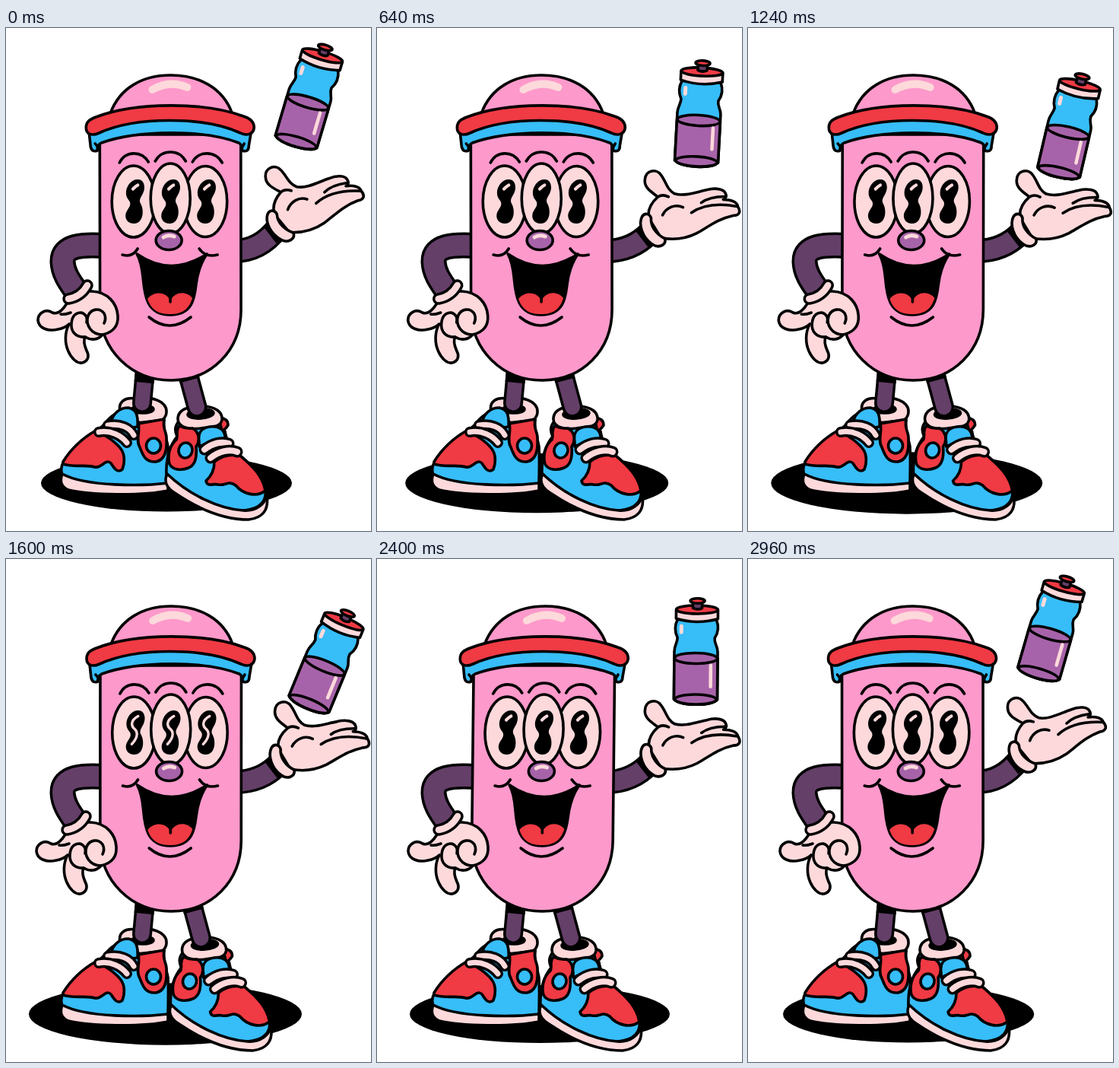
Recreate the animation shown at these times as an HTML page. Size 480 by 661 pixels, loop 3 s.

```html
<!DOCTYPE html>
<html lang="en">
<head>
<meta charset="utf-8">
<title>Capsule mascot</title>
<style>
html, body { margin: 0; width: 100%; height: 100%; overflow: hidden; background: #fff }
svg { display: block; width: 480px; height: 661px; stroke: #000; stroke-width: 3.6; stroke-linecap: round; stroke-linejoin: round; fill: none }
.pink { fill: #fd99cb } .pale { fill: #fdd9db } .red { fill: #f03a44 } .blue { fill: #37bdf8 }
.plum { fill: #643f68 } .violet { fill: #a763a9 } .ink { fill: #000 }
.shine { stroke: #fdd9db }
</style>
</head>
<body>
<svg id="stage" viewBox="0 0 480 661"></svg>
<script>
const PALE = '#fdd9db', PLUM = '#643f68', LOOP = 3000, STEP = 40;
const shape = (cls, d) => `<path class="${cls}" d="${d}"/>`;
const line = d => `<path d="${d}"/>`;
const oval = (cls, x, y, rx, ry, more = '') => `<ellipse class="${cls}" cx="${x}" cy="${y}" rx="${rx}" ry="${ry}" ${more}/>`;
const tube = (d, w, color, id = '') =>
  `<g id="${id}"><path d="${d}" stroke-width="${w}"/><path d="${d}" stroke-width="${w - 7}" stroke="${color}"/></g>`;
const shade = (d, w, id = '') => `<path id="${id}" d="${d}" stroke-width="${w}" stroke-linecap="butt"/>`;

const leftShoe =
  shape('pale', 'M150 504C147 490 158 485 170 487C190 483 212 490 211 505C210 517 196 521 180 521Z') +
  oval('ink', 180, 501, 14, 5) +
  shape('blue', 'M77 568C90 545 115 536 128 522C136 512 142 506 152 505L172 519L208 515C206 530 211 538 213 550C214 570 213 590 213 600C180 605 110 605 75 590C71 582 73 574 77 568Z') +
  shape('red', 'M75 570C88 549 104 537 118 529C132 535 146 546 151 553C157 561 156 573 153 580C147 585 143 580 138 572C131 565 126 579 117 577C106 573 90 578 75 573Z') +
  shape('red', 'M174 520L208 514C205 526 212 532 211 540C212 556 208 568 197 570C183 571 180 561 176 551C170 541 177 531 174 520Z') +
  oval('blue', 194, 549, 9.5, 10) +
  shape('blue', 'M138 520C140 505 151 499 161 499C171 501 174 508 173 524Q156 527 138 520Z') +
  tube('M134 522C150 519 163 525 168 535', 14, PALE) +
  tube('M122 531C138 528 152 536 159 545', 14, PALE) +
  shape('pale', 'M74 586C70 597 74 604 82 607C110 614 180 615 213 608L213 598C180 602 105 603 74 586Z');

const rightShoe =
  shape('red', 'M280 513Q292 512 292 522Q288 528 284 530Z') +
  shape('blue', 'M228 516C221 524 222 530 225 537C216 548 210 566 211 588C240 615 285 636 313 634C336 632 343 620 341 606C333 585 316 570 304 558C296 550 290 544 288 530L270 520Z') +
  shape('pale', 'M226 514C226 501 240 497 257 497C276 497 285 505 284 515C282 526 266 524 256 526C242 528 226 525 226 514Z') +
  oval('ink', 256, 507, 17, 6, 'transform="rotate(-4 256 507)"') +
  shape('red', 'M228 523C222 529 227 534 224 541C215 549 212 562 215 573C219 581 231 582 240 578C250 574 251 561 250 550C257 540 252 529 245 526Q236 527 228 523Z') +
  oval('blue', 236, 555, 9, 10, 'transform="rotate(15 236 555)"') +
  shape('red', 'M274 570C284 562 297 560 308 562C325 576 338 590 341 608C330 617 312 613 302 601C293 594 288 602 279 600C272 598 265 604 263 595C271 588 274 580 274 570Z') +
  shape('blue', 'M254 544C252 532 256 526 268 524C280 522 289 528 288 540Q270 542 254 550Z') +
  tube('M261 554C272 545 284 543 293 546', 15, PALE) +
  tube('M269 565C280 556 294 553 304 557', 15, PALE) +
  shape('pale', 'M212 586C207 596 212 605 222 611C250 630 285 646 319 646C337 644 346 634 343 614C340 626 330 635 312 634C280 632 240 613 212 586Z');

const leftHand =
  shape('pale', 'M80 362C75 370 68 377 61 374C52 368 42 375 42 384C43 395 56 399 68 396C74 395 79 393 83 389C77 400 77 414 82 425C86 434 93 441 100 440C108 438 110 431 106 424C103 417 102 410 104 406C112 411 121 410 127 403C140 400 148 392 147 378C146 362 134 347 113 346L104 346Z') +
  line('M72 376C78 377 82 375 85 374M104 406C92 407 85 399 86 388C87 378 92 374 99 374C106 376 107 382 106 387M127 403C112 403 104 390 108 378C112 369 123 367 129 375C131 379 131 384 129 388') +
  tube('M82 356Q99 353 107 338', 15.5, PALE);

const rightHand =
  shape('pale', 'M358 250C356 240 361 230 370 222C362 216 352 210 353 200C353 187 368 184 374 193C381 202 382 213 392 218C405 222 420 216 435 213C446 210 457 212 459 218C461 222 459 225 456 226C466 226 474 229 475 235C480 243 476 247 469 247C450 251 437 261 421 270C405 278 390 279 374 276Z') +
  line('M370 222Q376 218 384 222M376 246C381 236 393 231 403 236M458 222C445 222 435 224 427 230M474 235C453 231 430 232 414 243') +
  shape('pale', 'M349 248C344 258 349 275 362 284C370 290 381 286 379 277C369 272 360 262 361 250C359 243 352 243 349 248Z');

const pupil = 'M172 199C181 198 184 208 180 217C177 223 174 226 177 231C182 240 180 257 168 257C159 257 155 249 158 242C161 236 166 232 161 226C156 220 157 212 161 206C164 202 168 199 172 199Z';
const eye = i => `<g transform="translate(${47 * i} 0)"><path class="ink" stroke="none" d="${pupil}"/>
  <path class="shine glint" d="M173 206.500C163 212 163 219 169 224C174 229 171 237 164 244"/>
  <path class="shine gap" stroke-linecap="butt"/></g>`;

const body =
  shape('pink', 'M123 140L123.500 370C124 424 165 463 217 463C270 463 309 424 309 370L308.500 140Z') +
  shape('pink', 'M137 112C149 79 179 62 216 62C254 62 285 79 297 112Z') +
  '<path class="shine" stroke-width="10" d="M192 81Q215 68 238 78"/>' +
  shape('blue', 'M109 138L111 156Q113 164 120 161Q119 154 125 151C172 134 260 133 306 151Q311 154 310 161Q319 164 319 155L322 137L308 130C260 109 170 109 122 130Z') +
  line('M117 152L121 157M313 152L310 157') +
  shape('red', 'M105 131C105 123 110 120 118 117C170 97 262 97 312 116C322 119 326 124 326 131C325 140 316 142 308 138C260 116 170 116 122 138C113 142 105 140 105 131Z') +
  line('M149 177C157 161 178 161 187 176M196 175C205 159 227 159 236 175M245 176C253 161 275 161 284 177') +
  oval('pale', 167.5, 228, 28.500, 47) + oval('pale', 262, 228, 28.500, 46.500) + oval('pale', 216, 224, 26, 46) +
  [0, 1, 2].map(eye).join('') +
  oval('violet', 214, 279, 17, 12.500) +
  '<path class="shine" stroke-width="5" d="M207 275Q213 271 221 274"/>' +
  line('M153 298Q166 302 173 290M254 290Q262 302 278 298') +
  shape('ink', 'M172 297Q178 308 180 328C182 350 184 377 216 377C247 377 248 352 250 336Q253 313 264 297Q217 328 172 297Z') +
  '<path class="red" stroke="none" d="M186 356C194 345 212 346 216 359C222 345 238 346 245 355C240 371 230 376 216 376C201 376 191 371 186 356Z"/>' +
  line('M216 350V360M188 380Q215 402 243 380');

const bottle =
  shape('blue', 'M-25 -42C-30 -32 -28 -24 -25 -18C-25 -11 -29 -8 -29 0L-29 63C-20 72 20 72 28 63L28 0C28 -8 23 -10 24 -18C28 -24 30 -32 26 -42Z') +
  shape('violet', 'M-29 9L-29 63C-20 72 20 72 28 63L28 9Z') +
  oval('violet', -.5, 9, 28, 7) + oval('violet', -.5, 63, 27, 6.500) +
  shape('pale', 'M-27 -54V-43Q0 -35 28 -43V-54Z') +
  oval('red', .5, -55, 27.500, 5.500) +
  shape('plum', 'M-5 -66V-57Q1 -54 7 -57V-66Z') +
  oval('red', 1, -66.500, 9.500, 3.300) +
  '<path class="shine" stroke-width="5" d="M-20 -33V-25"/><path class="shine" stroke-width="4.500" d="M19 18V46"/>';

const $ = id => document.getElementById(id);
$('stage').innerHTML =
  '<ellipse id="shadow" class="ink" stroke="none" cy="598"/>' + leftShoe +
  tube('M183 450L179 493', 26, PLUM) + shade('M183 450L181.500 466', 26) +
  `<g id="rightFoot">${rightShoe + tube('M238 450L251 498', 27, PLUM) + shade('M238 450L241.500 463', 27)}</g>` +
  tube('M130 286C100 284 74 286 74.500 307C75 322 84 334 91 344', 34, PLUM) +
  tube('', 32, PLUM, 'rightArm') + shade('', 12, 'cuffShade') +
  `<g id="body">${body}</g><g id="leftHand">${leftHand}</g><g id="rightHand">${rightHand}</g><g id="bottle">${bottle}</g>`;

// Pose values at each key time, joined by a periodic cubic curve.
const keys = [0, 360, 920, 1600, 2080, 2400];
const pose = {
  bottleX: [400, 420.5, 424, 423, 428.5, 420],
  bottleY: [89, 101.5, 122, 132.5, 133.5, 121.5],
  bottleTilt: [16.5, 7, 3, 22.5, .5, .5],
  handX: [-2, -1, 0, 0, 2, 0],
  handY: [-6, -1, 0, 0, 2, -1],
  handTilt: [-8, -1.5, 0, .5, 1, -.5],
  lean: [.3, -.8, 1.5, 1, 3, 4.3],
  leftX: [0, -1, -1.5, -2, -2, -1],
  foot: [0, 4, 7, 5.5, 5, 4],
  shadowL: [46, 42, 33, 30, 40, 43],
  shadowR: [376, 381, 385, 389, 387, 385]
};

function curve(v, t) {
  const n = keys.length;
  const time = i => keys[(i + n) % n] + LOOP * Math.floor(i / n);
  const val = i => v[(i + n) % n];
  const slope = i => (val(i + 1) - val(i - 1)) / (time(i + 1) - time(i - 1));
  let i = n - 1;
  while (keys[i] > t) i--;
  const d = time(i + 1) - time(i), u = (t - time(i)) / d, w = 1 - u;
  return w * w * (1 + 2 * u) * val(i) + u * u * (1 + 2 * w) * val(i + 1) +
    d * u * w * (w * slope(i) - u * slope(i + 1));
}

const set = (el, attrs) => { for (const k in attrs) el.setAttribute(k, attrs[k]); };
const setTube = (id, d) => { for (const p of $(id).children) p.setAttribute('d', d); };
const gaps = document.querySelectorAll('.gap'), glints = document.querySelectorAll('.glint');

// A gap wipes up each pupil in turn; later the glints run down the pupils.
function drawEyes(t) {
  const away = Math.abs(t - 1600) / 250;
  const stretch = away < 1 ? Math.cos(away * Math.PI / 2) : 0;
  glints.forEach(g => set(g, { 'stroke-dasharray': `${8 + 36 * stretch} 99`, 'stroke-width': 4.2 - .8 * stretch }));
  gaps.forEach((g, i) => {
    const p = (t - 824 + 72 * i) / 400;
    if (p <= 0 || p >= 1) return g.setAttribute('d', '');
    const mid = 268 - 80 * p, half = 14 * (1 - p) ** 1.3;
    const top = mid - half, bottom = Math.min(mid + half, 262), y = (top + bottom) / 2;
    set(g, { d: `M155 ${y + 2}L184 ${y - 2}`, 'stroke-width': Math.max(0, bottom - top) });
  });
}

function draw(t) {
  const s = {};
  for (const k in pose) s[k] = curve(pose[k], t);
  const k = s.lean / 333;
  set($('body'), { transform: `matrix(1 0 ${-k} 1 ${k * 463} 0)` });
  set($('leftHand'), { transform: `translate(${s.leftX} 0)` });
  set($('rightHand'), { transform: `translate(${s.handX} ${s.handY}) rotate(${s.handTilt} 365 270)` });
  set($('bottle'), { transform: `translate(${s.bottleX} ${s.bottleY}) rotate(${s.bottleTilt})` });
  set($('rightFoot'), { transform: `translate(${s.foot} 0)` });
  const x = 359 + s.handX, y = 269 + s.handY;
  setTube('rightArm', `M298 293Q${x - 24} 294 ${x} ${y}`);
  set($('cuffShade'), { d: `M${x - 14} ${y - 6}L${x + 3} ${y + 16}` });
  set($('shadow'), { cx: (s.shadowL + s.shadowR) / 2, rx: (s.shadowR - s.shadowL) / 2, ry: 37.5 + (46 - s.shadowL) / 5 });
  drawEyes(t);
}

const start = performance.now();
function tick() {
  draw(Math.floor((performance.now() - start) % LOOP / STEP) * STEP);
  requestAnimationFrame(tick);
}
tick();
</script>
</body>
</html>
```
